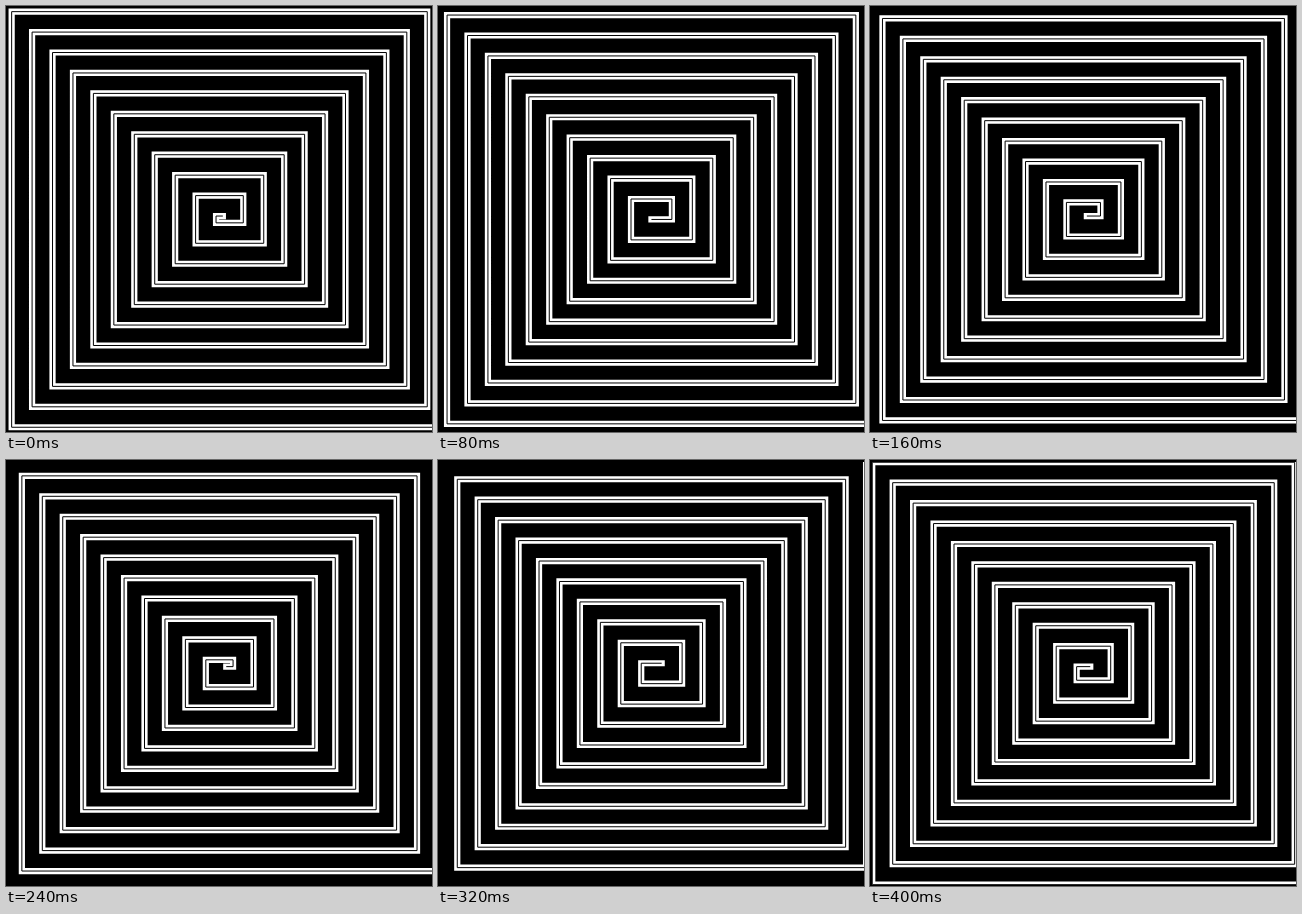
Recreate the animation shown at these times as an HTML page with a canvas. Size 426 px wide and 426 px high, loop 0.48 s.

```html
<!DOCTYPE html>
<html>
<head>
<meta charset="utf-8">
<title>Square spiral</title>
<style>
html, body { margin: 0; height: 100%; overflow: hidden; background: #000; }
canvas { display: block; }
</style>
</head>
<body>
<canvas id="stage" width="426" height="426"></canvas>
<script>
const ctx = document.getElementById('stage').getContext('2d');
const CENTER = 213.45, PITCH = 20.44, TURNS = 11;
const STEPS = 6, STEP_MS = 80;

// phase: fraction of one pitch by which the spiral is wound outwards
function spiral(phase) {
  const path = new Path2D();
  const at = r => CENTER + PITCH * r;
  if (phase >= 0) path.moveTo(at(phase), at(-phase));
  for (let k = 0; k < TURNS; k++) {
    const r = k + phase;
    if (k > 0 || phase >= 0) path.lineTo(at(-r), at(-r));
    path.lineTo(at(-r), at(r));
    path.lineTo(at(r + 1), at(r));
    path.lineTo(at(r + 1), at(-r - 1));
  }
  return path;
}

function stroke(path, color, width, cap) {
  ctx.strokeStyle = color;
  ctx.lineWidth = width;
  ctx.lineCap = cap;
  ctx.stroke(path);
}

function draw(now) {
  const step = Math.floor(now / STEP_MS) % STEPS;
  const shift = (step + 1) % STEPS - 1;
  const path = spiral((1 - shift) / STEPS);

  ctx.fillStyle = '#000';
  ctx.fillRect(0, 0, 426, 426);
  ctx.save();
  ctx.beginPath();
  ctx.rect(2, 2, 424, 423);
  ctx.clip();
  stroke(path, '#fff', 6.2, 'square');
  stroke(path, '#000', 1, 'butt');
  ctx.restore();
}

const start = performance.now();
function tick() {
  draw(performance.now() - start);
  requestAnimationFrame(tick);
}
tick();
</script>
</body>
</html>
```
